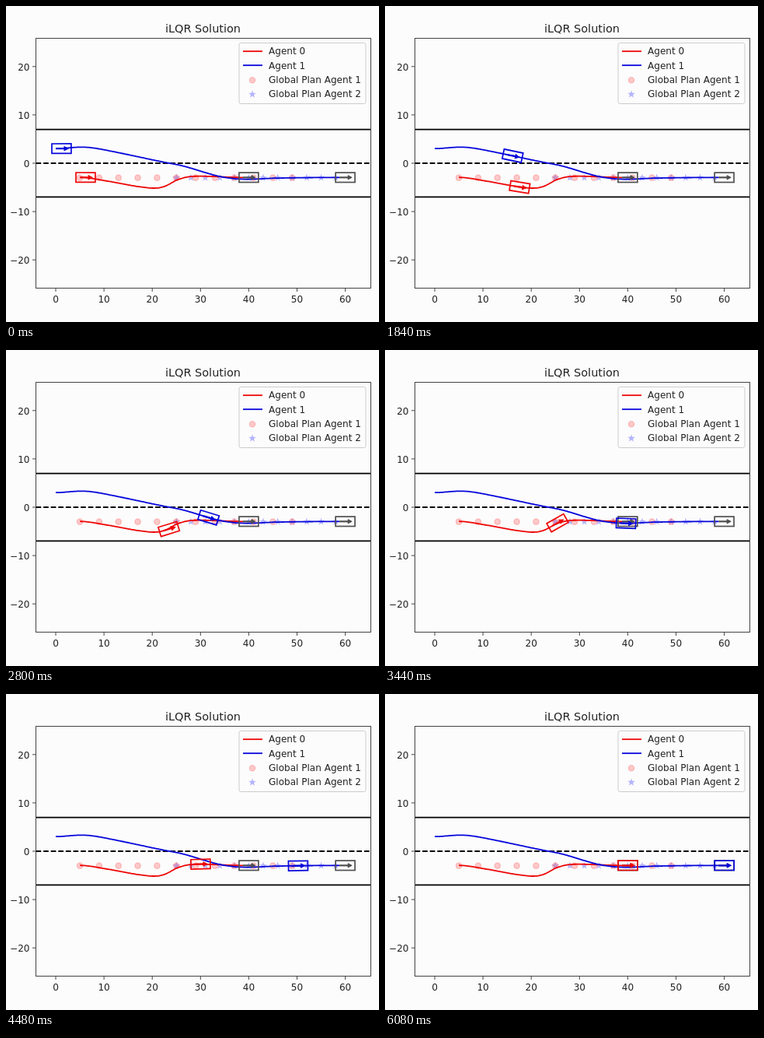
An HTML page for the animation above (7560 ms loop, 480 px wide and 406 px high).

```html
<!DOCTYPE html>
<html lang="en">
<head>
<meta charset="utf-8">
<title>Trajectory plot</title>
<style>
  html, body { margin: 0; width: 100%; height: 100%; overflow: hidden; background: #fcfcfc; }
  svg { display: block; width: 100vw; height: 100vh; }
  text { font: 12.05px "DejaVu Sans", sans-serif; fill: #222; }
  .title { font-size: 14.46px; }
  .frame { fill: none; stroke: #444; stroke-width: 1; }
  .lane { stroke: #000; stroke-width: 1.8; }
  .dashed { stroke-dasharray: 6.7 2.9; }
  .path { fill: none; stroke-width: 1.8; stroke-linejoin: round; }
  .marker { fill-opacity: .2; stroke-opacity: .2; stroke-width: 1.2; }
  .legend { fill: #fcfcfc; fill-opacity: .9; stroke: #ccc; }
</style>
</head>
<body>
<svg id="stage" viewBox="0 0 480 406"></svg>
<script>
const LOOP = 7560, STEP = 80;
const UNIT = 6.21;
const RED = "#ee0505", BLUE = "#0505dc", GREY = "#505050";
const stage = document.getElementById("stage");
const px = x => 64 + x * UNIT;
const py = y => 202 - y * UNIT;

function add(tag, attrs, parent = stage) {
  const node = document.createElementNS(stage.namespaceURI, tag);
  for (const name in attrs) node.setAttribute(name, attrs[name]);
  return parent.appendChild(node);
}

function label(text, x, y, anchor = "start", cls = "") {
  add("text", { x, y, "text-anchor": anchor, class: cls }).textContent = text;
}

function line(x1, y1, x2, y2, attrs) {
  add("line", { x1, y1, x2, y2, ...attrs });
}

// Smooth curve through [u, v] points, level at both ends.
function spline(points) {
  const last = points.length - 1;
  const slope = i => {
    if (i === 0 || i === last) return 0;
    const a = points[i - 1], b = points[i + 1];
    return (b[1] - a[1]) / (b[0] - a[0]);
  };
  return u => {
    if (u <= points[0][0]) return points[0][1];
    if (u >= points[last][0]) return points[last][1];
    const i = points.findIndex(p => p[0] > u) - 1;
    const [u0, v0] = points[i], [u1, v1] = points[i + 1];
    const h = u1 - u0, s = (u - u0) / h, r = 1 - s;
    return v0 * (1 + 2 * s) * r * r + v1 * s * s * (3 - 2 * s)
      + h * s * r * (slope(i) * r - slope(i + 1) * s);
  };
}

// A vehicle's origin is its rear axle.
function vehicle(color) {
  const g = add("g", { stroke: color, fill: color });
  add("rect", { x: -5, y: -6.2, width: 24.9, height: 12.4, fill: "none", "stroke-width": 1.7 }, g);
  add("path", { d: "M0 0H12", "stroke-width": 2.2 }, g);
  add("path", { d: "M11 -2.6L16 0L11 2.6Z", "stroke-width": 1 }, g);
  return g;
}

function place(node, x, y, angle = 0) {
  node.setAttribute("transform", `translate(${x} ${y}) rotate(${angle})`);
}

function dot(x, y) {
  add("circle", { cx: x, cy: y, r: 3.7, fill: "#f00", stroke: "#f00", class: "marker" });
}

function star(x, y) {
  const points = Array.from({ length: 10 }, (_, i) => {
    const r = i % 2 ? 1.4 : 3.6, a = i * Math.PI / 5;
    return `${x + r * Math.sin(a)},${y - r * Math.cos(a)}`;
  });
  add("polygon", { points: points.join(" "), fill: "#00f", stroke: "#00f", class: "marker" });
}

// travel: time to x; height: x to y along the route.
const agents = [
  {
    color: RED, start: 95, end: 305,
    travel: spline([[0, 95], [960, 123.5], [1840, 166], [2800, 202.5], [3440, 215.5], [4480, 243], [6080, 305]]),
    height: spline([[95, 220.2], [130, 224.9], [170, 232], [192, 234], [205, 231.4], [222, 222.8],
      [242, 218.8], [305, 220.3]])
  },
  {
    color: BLUE, start: 64, end: 429.3,
    travel: spline([[0, 64], [960, 92.5], [1840, 157], [2800, 253.5], [3440, 302.7], [4480, 368.5], [6080, 429.3]]),
    height: spline([[64, 183.2], [98, 181.3], [120, 183.6], [200, 200], [228, 205.6], [275, 219],
      [305, 222.5], [350, 221.1], [429.3, 220.3]])
  }
];

function drawPath({ color, start, end, height }) {
  const points = [];
  for (let x = start; x < end; x += 2) points.push(`${x},${height(x)}`);
  points.push(`${end},${height(end)}`);
  add("polyline", { points: points.join(" "), class: "path", stroke: color });
}

// Plot
for (let i = 0; i < 12; i++) {
  dot(px(5 + 4 * i), py(-3));
  star(px(25 + 3 * i), py(-3));
}
for (const y of [-7, 0, 7]) line(38.5, py(y), 469, py(y), { class: y ? "lane" : "lane dashed" });
agents.forEach(drawPath);
for (const goal of [40, 60]) place(vehicle(GREY), px(goal) - 7.45, 220.3);
for (const agent of agents) agent.node = vehicle(agent.color);

// Axes
add("rect", { x: 38.5, y: 41.5, width: 431, height: 321, class: "frame" });
for (let v = 0; v <= 60; v += 10) {
  line(px(v), 362.5, px(v), 367, { class: "frame" });
  label(v, px(v), 381, "middle");
}
for (let v = -20; v <= 20; v += 10) {
  line(34, py(v), 38.5, py(v), { class: "frame" });
  label(String(v).replace("-", "\u2212"), 30.5, py(v) + 4.7, "end");
}
label("iLQR Solution", 253.5, 34, "middle", "title");

// Legend
add("rect", { x: 300, y: 47.5, width: 163, height: 78, rx: 2.4, class: "legend" });
[RED, BLUE].forEach((stroke, i) => line(305, 58.2 + 18 * i, 330, 58.2 + 18 * i, { class: "path", stroke }));
dot(317, 95.2);
star(317, 113.5);
["Agent 0", "Agent 1", "Global Plan Agent 1", "Global Plan Agent 2"]
  .forEach((text, i) => label(text, 338, 62.4 + 18.2 * i));

function render(now) {
  const time = now % LOOP;
  const pose = time - time % STEP;
  for (const { node, travel, height } of agents) {
    const x = travel(pose);
    const slope = (height(x + 1) - height(x - 1)) / 2;
    place(node, x, height(x), Math.atan(slope) * 180 / Math.PI);
  }
}

const began = performance.now();
function tick() {
  render(performance.now() - began);
  requestAnimationFrame(tick);
}
tick();
</script>
</body>
</html>
```
